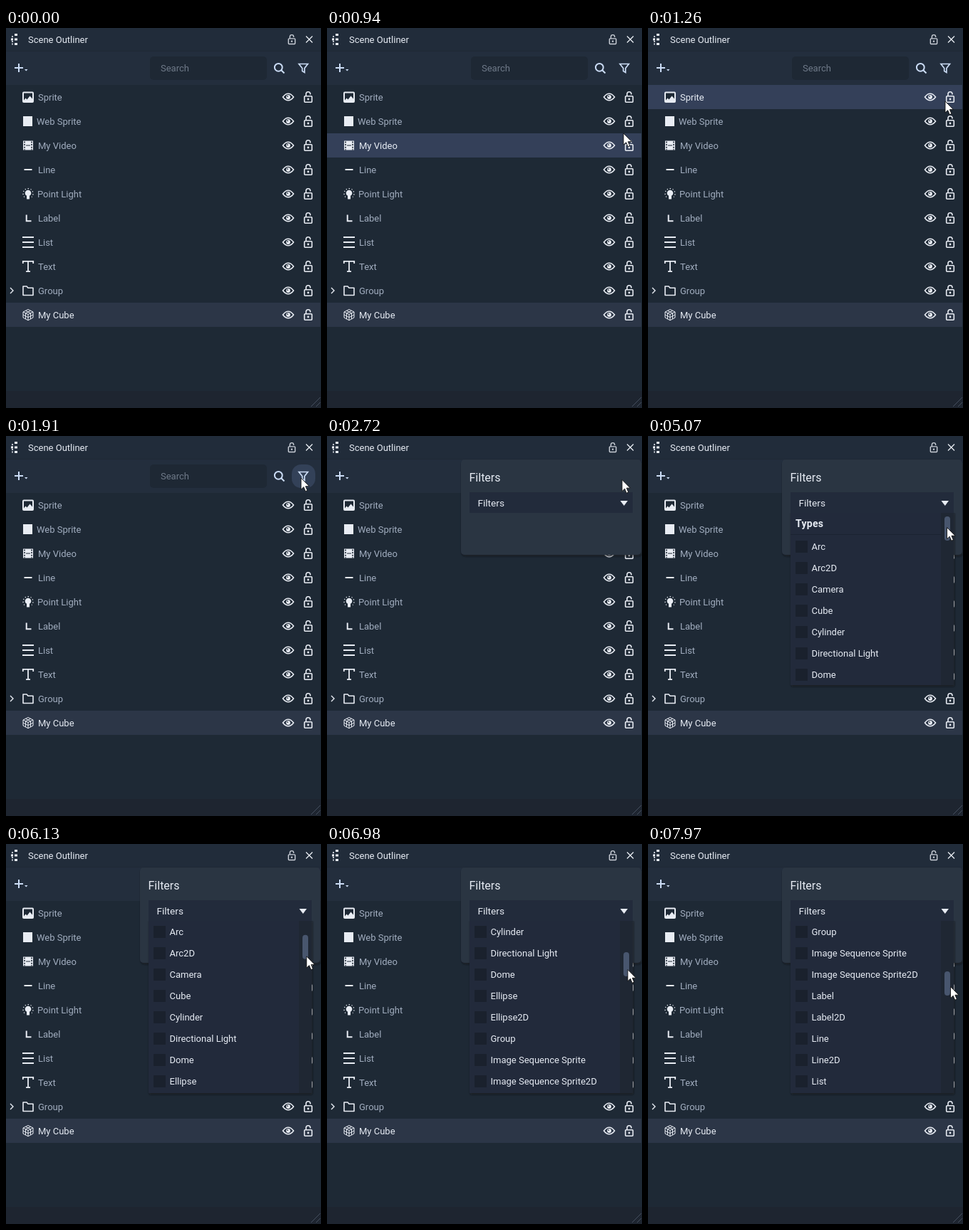
Write an HTML page that moves like this. It is 442 px wide and 534 px high and loops after 8000 ms.

```html
<!DOCTYPE html>
<html lang="en">
<head>
<meta charset="utf-8">
<title>Scene Outliner</title>
<style>
  html, body { margin: 0; width: 100%; height: 100%; overflow: hidden; background: #1e2935; }
  svg { display: block; width: 442px; height: 534px; }
  text { font: 13px Roboto, sans-serif; fill: #e6ebf3; white-space: pre; }
  .dim { fill: #a1adbf; }
  .line { fill: none; stroke: #e8ecf3; stroke-width: 1.6; }
  .solid { fill: #e8ecf3; }
  .tool { fill: none; stroke: #cbdcf5; stroke-width: 2; }
  .dark { fill: #1e2935; }
</style>
</head>
<body>
<svg viewBox="0 0 442 534">
  <defs>
    <g id="eye">
      <path class="line" d="M-7.5 0Q-4 -4.8 0 -4.8T7.5 0Q4 4.8 0 4.8T-7.5 0Z"/>
      <circle class="solid" r="2.9"/>
      <circle class="dark" cx="-.9" cy="-.9" r=".9"/>
    </g>
    <g id="lock">
      <rect class="line" x="-5.3" y="-1.3" width="10.6" height="8.6" rx="1"/>
      <path class="line" d="M-3 -1.5V-4.2a3 3 0 0 1 6 0V-3.5"/>
      <circle class="solid" cy="3" r="1.4"/>
    </g>
    <clipPath id="below"><rect x="190" y="108" width="252" height="260"/></clipPath>
    <filter id="shadow" x="-10%" y="-10%" width="120%" height="125%">
      <feDropShadow dx="1" dy="2" stdDeviation="1.5" flood-color="#0c1118" flood-opacity=".6"/>
    </filter>
  </defs>

  <rect width="442" height="534" fill="#1e2935"/>
  <rect width="442" height="33" fill="#212c3a"/>
  <rect y="33" width="442" height="47" fill="#232e3d"/>
  <rect y="32" width="442" height="1" fill="#1f2936"/>
  <rect y="510" width="442" height="24" fill="#1e2530"/>
  <path d="M428 532L441 519M435 532L441 526" stroke="#465060" fill="none"/>

  <path class="line" d="M9 11V24" stroke-width="2" stroke-dasharray="2 1.5"/>
  <path class="solid" d="M12 8h4v3h-4zM12 14.5h4v3h-4zM12 21h4v3h-4zM7 14.5h3v3h-3z"/>
  <text x="31" y="21">Scene Outliner</text>
  <use href="#lock" transform="translate(401 16) scale(.88)" opacity=".85"/>
  <path class="line" d="M421 11.5l9 9M430 11.5l-9 9" style="stroke-width:1.3"/>

  <path class="tool" d="M12 56h12M18 50v12"/>
  <path d="M26 58h4.5l-2.2 2.6z" fill="#cbdcf5"/>
  <rect x="202" y="40" width="164" height="33" rx="5" fill="#1e2834"/>
  <text x="217" y="61" style="fill:#6f7a89">Search</text>
  <rect id="filterHover" x="401" y="40" width="33" height="33" rx="13" fill="#334158"/>
  <path class="tool" d="M386.2 59.2L390.5 63.5"/>
  <circle class="tool" cx="382.3" cy="55.3" r="5.4"/>
  <path class="tool" d="M411 50.5h12.5l-4.6 6v6l-3.2 -2v-4z" style="stroke-width:1.7"/>

  <g id="tree"></g>

  <g id="popup">
    <rect x="188" y="33" width="253" height="134" rx="5" fill="#2a3443" filter="url(#shadow)"/>
    <text x="199.5" y="64" style="font-size:16px">Filters</text>
    <g clip-path="url(#below)">
      <g id="dropdown">
        <rect x="200" y="106" width="229" height="244" fill="#222b3b" filter="url(#shadow)"/>
        <rect x="411" y="106" width="18" height="244" fill="#1f2733"/>
        <g id="options"></g>
        <rect id="thumb" x="416" width="8" height="34" rx="4" fill="#48566e"/>
      </g>
    </g>
    <rect id="field" x="200" y="79" width="229" height="29" fill="#222b3b"/>
    <path class="solid" d="M411.5 91h10.5l-5.2 7z"/>
    <text id="fieldText" y="99" style="font-size:13.6px">Filters</text>
  </g>

  <path id="cursor" d="M0 0v16.2l3.7-3.5 2.5 6 2.7-1.1-2.5-5.9h5.1z" fill="#fff" stroke="#111" stroke-width=".9"/>
</svg>

<script>
const LOOP = 8000, ROW = 34, TOP = 80;
const $ = id => document.getElementById(id);

// Icons are drawn around the centre of their row.
const nodes = [
  ['Sprite', 45, `<rect class="solid" x="-8" y="-7.5" width="16" height="15.5" rx="2"/>
    <path class="dark" d="M-6 -5.5H6V2.5L2.5 -1.5L-1.5 3.5L-3.5 1.5L-6 4.5Z"/>`],
  ['Web Sprite', 43, '<rect class="solid" x="-7" y="-7" width="13" height="14"/>'],
  ['My Video', 45, `<rect class="solid" x="-7" y="-6.5" width="14" height="13"/>
    <path stroke="#1e2935" stroke-width="1.6" stroke-dasharray="2 1.6" d="M-5 -5.5V6.5M5 -5.5V6.5"/>
    <path stroke="#1e2935" d="M-3 0H3"/>`],
  ['Line', 45, '<path class="line" d="M-5.5 0H5.5" style="stroke-width:2"/>'],
  ['Point Light', 44, `<circle class="solid" cy="-1" r="4.3"/><path class="solid" d="M-2 2h4v5.5h-4z"/>
    <path class="line" d="M-5 4.5A7 7 0 1 1 5 4.5" style="stroke-width:1.3;stroke-dasharray:1.3 2.6"/>`],
  ['Label', 45, '<path class="line" d="M-2.3 -4.5V4.2H4.5" style="stroke-width:2"/>'],
  ['List', 45, '<path class="line" d="M-8 -7H8M-8 0H8M-8 7H8" style="stroke-width:2"/>'],
  ['Text', 45, '<path class="line" d="M-7.2 -4V-7.2H7.2V-4M0 -7V7.2M-3 7.2H3" style="stroke-width:1.8"/>'],
  ['Group', 45, `<path class="line" d="M-7 -6H-2L0 -3.7H7V6.5H-7Z" stroke-linejoin="round"/>
    <path class="line" d="M-25 -4l4 4l-4 4" style="stroke-width:1.4"/>`],
  ['My Cube', 45, `<path class="line" style="stroke-width:1"
    d="M0 -7.5L7 -4V4L0 7.8L-7 4V-4ZM-7 -4L0 -.5L7 -4M0 -.5V7.8M-3.5 -5.7L3.5 -2.2V6M3.5 -5.7L-3.5 -2.2V6M-7 0L0 3.6L7 0"/>`]
];
const types = ['Arc', 'Arc2D', 'Camera', 'Cube', 'Cylinder', 'Directional Light', 'Dome', 'Ellipse',
  'Ellipse2D', 'Group', 'Image Sequence Sprite', 'Image Sequence Sprite2D', 'Label', 'Label2D',
  'Line', 'Line2D', 'List', 'List2D'];

$('tree').innerHTML = nodes.map(([name, x, icon], i) => `
  <g transform="translate(0 ${TOP + ROW * i + 17})">
    <rect class="back" y="-17" width="441" height="${ROW}"/>
    <g transform="translate(31 0)">${icon}</g>
    <text x="${x}" y="5">${name}</text>
    <use href="#eye" x="396"/><use href="#lock" x="424"/>
  </g>`).join('');
const rows = [...$('tree').children].map(g => ({ back: g.querySelector('.back'), label: g.querySelector('text') }));

// time, cursor x, cursor y, thumb y, first visible option
const track = [
  [400, 434, 338, 113, 0],
  [640, 423, 246, 113, 0],
  [940, 416, 148.2, 113, 0],
  [1180, 417, 105, 113, 0],
  [1260, 417, 103, 113, 0],
  [1600, 416, 74, 113, 0],
  [1910, 414, 59, 113, 0],
  [2680, 414, 59, 113, 0],
  [3100, 414, 84, 113, 0],
  [3780, 414, 84, 113, 0],
  [4070, 416.5, 113, 113, 0],
  [4380, 416.5, 113, 113, 0],
  [5070, 419.5, 128.5, 113, 0],
  [5210, 419.5, 131, 113, 0],
  [5630, 420, 146, 113, 0],
  [5730, 420, 146, 113, 0],
  [6540, 423.5, 170, 143, 4],
  [6980, 422, 176.5, 152, 5.3],
  [7070, 422, 178, 154, 5.6],
  [7220, 422, 178, 154, 5.6],
  [7960, 424.5, 200.5, 179, 10.2]
];

function pose(t) {
  const i = track.findIndex(k => k[0] > t);
  if (i < 0) return track.at(-1).slice(1);
  if (i === 0) return track[0].slice(1);
  const [a, b] = [track[i - 1], track[i]];
  const f = (t - a[0]) / (b[0] - a[0]);
  return a.map((v, j) => v + (b[j] - v) * f).slice(1);
}

function option(name, y) {
  return `<rect x="207" y="${y - 8}" width="17" height="17" rx="1" fill="#1a212d"/>
    <text x="229.5" y="${y + 5}">${name}</text>`;
}

let shownFirst = -1;
function showOptions(first) {
  if (first === shownFirst) return;
  shownFirst = first;
  $('options').innerHTML = first
    ? types.slice(first - 1, first + 7).map((name, i) => option(name, 123 + 30 * i)).join('')
    : `<text x="207" y="128" style="font-size:14px;font-weight:700;letter-spacing:.3px">Types</text>
       <rect x="200" y="138" width="211" height="1" fill="#1b2331"/>`
      + types.slice(0, 7).map((name, i) => option(name, 155 + 30 * i)).join('');
}

const show = (id, on) => $(id).style.display = on ? '' : 'none';

function draw(t) {
  const [x, y, thumbY, first] = pose(t);
  show('cursor', t >= 400);
  $('cursor').setAttribute('transform', `translate(${x} ${y})`);

  const hovered = t >= 400 && t < 2000 ? Math.floor((y - TOP) / ROW) : -1;
  rows.forEach(({ back, label }, i) => {
    const selected = i === rows.length - 1;
    back.setAttribute('fill', i === hovered ? '#344059' : selected ? '#2c3647' : 'none');
    label.setAttribute('class', i === hovered || selected ? '' : 'dim');
  });
  show('filterHover', t >= 1260 && y < 73);

  show('popup', t >= 2070);
  $('popup').style.opacity = t < 2130 ? .6 : 1;

  const opening = t >= 3250 && t < 3400;
  show('dropdown', t >= 3250);
  const slide = t < 3310 ? -230 : t < 3400 ? -111 : 0;
  $('dropdown').setAttribute('transform', `translate(0 ${slide})`);
  $('field').setAttribute('stroke', opening ? '#97a2b3' : 'none');
  $('field').setAttribute('transform', opening ? 'translate(.5 .5)' : '');
  $('fieldText').setAttribute('x', opening ? 212.5 : 211.5);
  $('thumb').setAttribute('y', thumbY);
  showOptions(Math.floor(first));
}

function tick() {
  draw(performance.now() % LOOP);
  requestAnimationFrame(tick);
}
tick();
</script>
</body>
</html>
```
